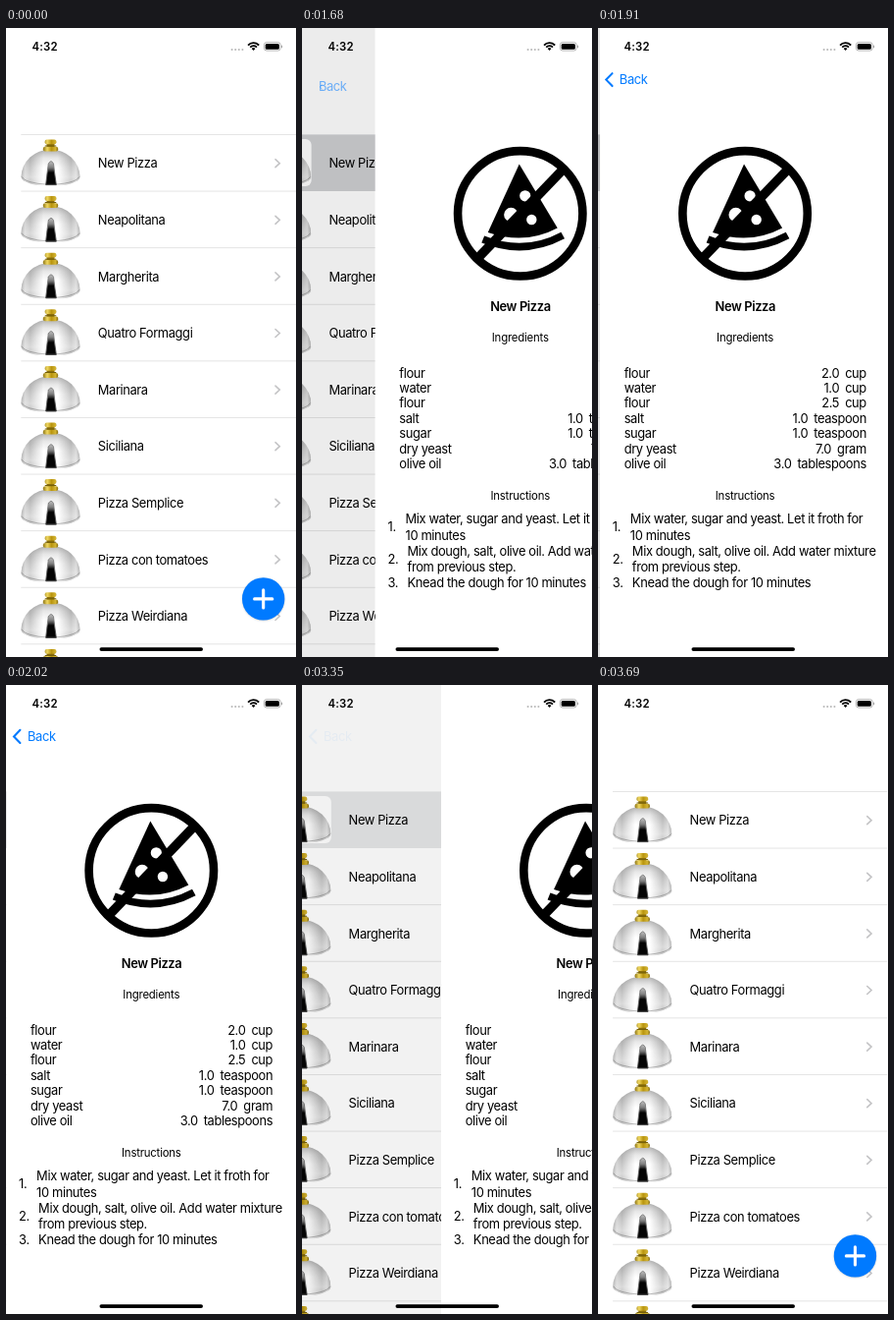
An HTML page with a canvas for the animation above (3.79 s loop, 296 by 640 pixels).

```html
<!DOCTYPE html>
<html lang="en">
<head>
<meta charset="utf-8">
<title>Pizza recipes</title>
<style>
html, body { margin: 0; width: 100%; height: 100%; overflow: hidden; background: #fff; }
canvas { display: block; width: 296px; height: 640px; }
</style>
</head>
<body>
<canvas id="stage"></canvas>
<script>
const W = 296, H = 640, LOOP = 3790;
const STEPS = [0, 1560, 1680, 1790, 1910, 2020, 3140, 3240, 3350, 3460, 3570, 3690];
const PUSH = 1539, POP = 3265, RATE = 0.019;
const BLUE = '#007aff';
const PIZZAS = ['New Pizza', 'Neapolitana', 'Margherita', 'Quatro Formaggi', 'Marinara',
  'Siciliana', 'Pizza Semplice', 'Pizza con tomatoes', 'Pizza Weirdiana', 'Pizza Bianca'];
const INGREDIENTS = [
  ['flour', '2.0', 'cup'], ['water', '1.0', 'cup'], ['flour', '2.5', 'cup'],
  ['salt', '1.0', 'teaspoon'], ['sugar', '1.0', 'teaspoon'],
  ['dry yeast', '7.0', 'gram'], ['olive oil', '3.0', 'tablespoons']];
const ROW = 57.6, TOP = 108.4;

const canvas = document.getElementById('stage');
const ctx = canvas.getContext('2d');
const dpr = window.devicePixelRatio || 1;
canvas.width = W * dpr;
canvas.height = H * dpr;

const clamp = v => Math.max(0, Math.min(1, v));

// Critically damped spring from 0 to 1
function spring(ms) {
  const x = Math.max(0, ms) * RATE;
  return 1 - (1 + x) * Math.exp(-x);
}

function text(str, x, y, { size = 12.9, weight = 400, align = 'left', color = '#000', track = -0.38 } = {}) {
  ctx.font = `${weight} ${size}px Inter, "Liberation Sans", sans-serif`;
  ctx.letterSpacing = track + 'px';
  ctx.fillStyle = color;
  ctx.textAlign = 'left';
  const w = ctx.measureText(str).width;
  ctx.fillText(str, x - (align === 'right' ? w : align === 'center' ? w / 2 : 0), y);
  return w;
}

function pill(x, y, w, h, r, color) {
  ctx.fillStyle = color;
  ctx.beginPath();
  ctx.roundRect(x, y, w, h, r);
  ctx.fill();
}

function disc(x, y, r, color) {
  ctx.fillStyle = color;
  ctx.beginPath();
  ctx.arc(x, y, r, 0, Math.PI * 2);
  ctx.fill();
}

function line(points, width, color, cap = 'round') {
  ctx.strokeStyle = color;
  ctx.lineWidth = width;
  ctx.lineCap = cap;
  ctx.lineJoin = 'miter';
  ctx.beginPath();
  points.forEach(([x, y]) => ctx.lineTo(x, y));
  ctx.stroke();
}

function ramp(x0, y0, x1, y1, colors) {
  const g = ctx.createLinearGradient(x0, y0, x1, y1);
  colors.forEach(([at, c]) => g.addColorStop(at, c));
  return g;
}

// Origin is the top left corner of the thumbnail
function dome(x, y) {
  ctx.save();
  ctx.translate(x, y);
  ctx.beginPath();
  ctx.ellipse(30.5, 38.5, 30, 28, 0, Math.PI, 0);
  ctx.ellipse(30.5, 38.5, 30, 9.3, 0, 0, Math.PI);
  ctx.closePath();
  ctx.save();
  ctx.clip();
  ctx.fillStyle = ramp(0, 0, 61, 0, [[0, '#858585'], [0.07, '#cdcdcd'], [0.16, '#b9b9b9'],
    [0.27, '#dedede'], [0.38, '#fff'], [0.62, '#fff'], [0.72, '#e0e0e0'],
    [0.84, '#bababa'], [0.93, '#d2d2d2'], [1, '#858585']]);
  ctx.fillRect(0, 8, 61, 42);
  ctx.fillStyle = ramp(0, 10, 0, 48, [[0, 'rgba(80,80,80,.5)'], [0.25, 'rgba(150,150,150,.22)'],
    [0.5, 'rgba(255,255,255,.2)'], [0.75, 'rgba(255,255,255,.45)'], [1, 'rgba(255,255,255,.1)']]);
  ctx.fillRect(0, 8, 61, 42);
  ctx.filter = 'blur(.6px)';
  ctx.fillStyle = ramp(0, 21, 0, 34, [[0, 'rgba(60,60,60,.2)'], [0.6, 'rgba(40,40,40,.6)'], [1, '#050505']]);
  ctx.beginPath();
  ctx.moveTo(28.3, 25);
  ctx.quadraticCurveTo(31, 20, 33.5, 25);
  ctx.quadraticCurveTo(34.5, 34, 36.3, 46.5);
  ctx.lineTo(25.7, 46.5);
  ctx.quadraticCurveTo(27, 34, 28.3, 25);
  ctx.fill();
  ctx.restore();
  ctx.strokeStyle = ramp(0, 10, 0, 48, [[0, '#8d8d8d'], [0.6, '#707070'], [1, '#383838']]);
  ctx.lineWidth = 0.9;
  ctx.stroke();
  ctx.strokeStyle = 'rgba(70,70,70,.5)';
  ctx.lineWidth = 0.7;
  ctx.beginPath();
  ctx.ellipse(30.5, 37.5, 29.2, 8.6, 0, 0.1, Math.PI - 0.1);
  ctx.stroke();
  const gold = ramp(22, 0, 39, 0, [[0, '#7b6208'], [0.3, '#f0d862'], [0.55, '#b8940f'],
    [0.8, '#d3b433'], [1, '#6d5606']]);
  pill(26.5, 4, 8, 5, 0, '#8b6f0c');
  pill(24.6, 0.4, 11.8, 4.8, 2, gold);
  pill(22.8, 7.6, 15.4, 4.8, 2, gold);
  pill(24.6, 6.4, 11.8, 1, 0.5, '#756009');
  ctx.restore();
}

function list(mark) {
  if (mark > 0) {
    ctx.globalAlpha = mark;
    ctx.fillStyle = '#cecfd2';
    ctx.fillRect(0, TOP, W + 20, ROW);
    ctx.globalAlpha = 1;
    pill(15, 113, 61, 48, 6, '#fff');
  }
  PIZZAS.forEach((name, i) => {
    const y = TOP + ROW * i, mid = y + 29.3;
    if (!(mark > 0.5 && i < 2)) {
      ctx.fillStyle = '#e2e2e2';
      ctx.fillRect(15.3, y - 0.4, W - 15.3, 0.9);
    }
    dome(15, y + 4.7);
    text(name, 93.8, mid + 4.7);
    line([[275, mid - 4], [279.3, mid], [275, mid + 4]], 1.6, 'rgba(60,60,67,.3)');
  });
  ctx.save();
  ctx.shadowColor = 'rgba(0,0,0,.2)';
  ctx.shadowBlur = 2 * dpr;
  ctx.shadowOffsetY = 0.6 * dpr;
  disc(262.7, 580.9, 21.7, BLUE);
  ctx.restore();
  line([[253.6, 580.9], [271.8, 580.9]], 3.1, '#fff');
  line([[262.7, 571.8], [262.7, 590]], 3.1, '#fff');
}

function noPizza() {
  ctx.fillStyle = '#000';
  ctx.beginPath();
  ctx.moveTo(147, 138.5);
  ctx.lineTo(186, 203.5);
  ctx.quadraticCurveTo(153, 221, 115, 208);
  ctx.closePath();
  ctx.fill();
  ctx.strokeStyle = '#000';
  ctx.lineCap = 'butt';
  ctx.lineWidth = 7.6;
  ctx.beginPath();
  ctx.moveTo(110, 215);
  ctx.quadraticCurveTo(152, 232, 191.5, 211);
  ctx.stroke();
  disc(153, 170.8, 5.6, '#fff');
  disc(138.6, 190, 7.2, '#fff');
  disc(159.6, 195, 5.2, '#fff');
  line([[103, 236], [193, 142.5]], 9.6, '#000', 'butt');
  ctx.lineWidth = 8.6;
  ctx.beginPath();
  ctx.arc(148, 188.8, 63.7, 0, Math.PI * 2);
  ctx.stroke();
}

function detail() {
  ctx.fillStyle = '#fff';
  ctx.fillRect(0, 0, W + 1, H);
  noPizza();
  const head = { size: 11.4, align: 'center', track: -0.21 };
  text('New Pizza', 148.2, 287.7, { weight: 600, align: 'center' });
  text('Ingredients', 148, 319.4, head);
  INGREDIENTS.forEach(([name, amount, unit], i) => {
    const y = 355.6 + 15.4 * i;
    text(name, 24.6, y);
    const w = text(unit, 271.8, y, { align: 'right' });
    text(amount, 271.8 - w - 6, y, { align: 'right' });
  });
  text('Instructions', 148, 480.4, head);
  text('1.', 12.8, 512.4);
  text('Mix water, sugar and yeast. Let it froth for', 30.8, 504.2);
  text('10 minutes', 30.8, 520.8);
  text('2.', 12.8, 544.6);
  text('Mix dough, salt, olive oil. Add water mixture', 32.8, 536.6);
  text('from previous step.', 32.8, 553);
  text('3.', 12.8, 568.6);
  text('Knead the dough for 10 minutes', 32.8, 568.6);
}

function backButton(alpha, p) {
  if (alpha <= 0) return;
  const q = 1 - p, s = Math.max(0.3, 1 - 2.6 * q);
  ctx.save();
  ctx.globalAlpha = alpha;
  ctx.translate(-20 * q, 30 * q);
  text('Back', 22, 56.8, { color: BLUE });
  ctx.translate(12 + 50 * q, 52.4);
  ctx.scale(s, s);
  line([[2.4, -6.6], [-4, 0], [2.4, 6.6]], 2.1, BLUE);
  ctx.restore();
}

function statusBar() {
  text('4:32', 26.6, 23, { size: 11.4, weight: 600, track: 0.15 });
  for (let i = 0; i < 4; i++) disc(230.6 + 3.6 * i, 22, 1.05, '#b9b9b9');
  ctx.strokeStyle = '#000';
  ctx.lineCap = 'butt';
  ctx.lineWidth = 1.8;
  [7.6, 4.6].forEach(r => {
    ctx.beginPath();
    ctx.arc(252.6, 22.8, r, -Math.PI * 0.76, -Math.PI * 0.24);
    ctx.stroke();
  });
  ctx.fillStyle = '#000';
  ctx.beginPath();
  ctx.moveTo(252.6, 23);
  ctx.arc(252.6, 22.8, 2.6, -Math.PI * 0.76, -Math.PI * 0.24);
  ctx.fill();
  ctx.strokeStyle = '#a0a0a0';
  ctx.lineWidth = 0.8;
  ctx.beginPath();
  ctx.roundRect(263.4, 14.6, 16.8, 8.4, 2.6);
  ctx.stroke();
  pill(264.7, 15.9, 14.2, 5.8, 1.5, '#000');
  pill(281.1, 17.4, 1, 2.8, 0.6, '#a0a0a0');
}

function draw(t) {
  let p = 0, mark = 0, back = 0, backP = 1;
  if (t >= 3140) {
    p = 1 - spring(t - POP);
    mark = p;
    back = 0.2 * p * p;
  } else if (t >= 1560) {
    p = spring(t - PUSH);
    mark = 1;
    backP = p;
    back = clamp((p - 0.5) / 0.45);
  }
  const edge = W * (1 - p);
  ctx.setTransform(dpr, 0, 0, dpr, 0, 0);
  ctx.fillStyle = '#fff';
  ctx.fillRect(0, 0, W, H);
  if (edge > 0) {
    ctx.save();
    ctx.translate(-0.3 * W * p, 0);
    list(mark);
    ctx.restore();
    ctx.fillStyle = `rgba(0,0,0,${0.1 * p})`;
    ctx.fillRect(0, 0, edge, H);
  }
  if (p > 0) {
    ctx.save();
    ctx.translate(edge, 0);
    detail();
    ctx.restore();
  }
  backButton(back, backP);
  statusBar();
  pill(95.5, 630.2, 105.5, 3.8, 1.9, '#000');
}

const start = performance.now();
function frame() {
  const t = (performance.now() - start) % LOOP;
  draw(STEPS.findLast(s => s <= t) ?? 0);
  requestAnimationFrame(frame);
}
frame();
</script>
</body>
</html>
```
